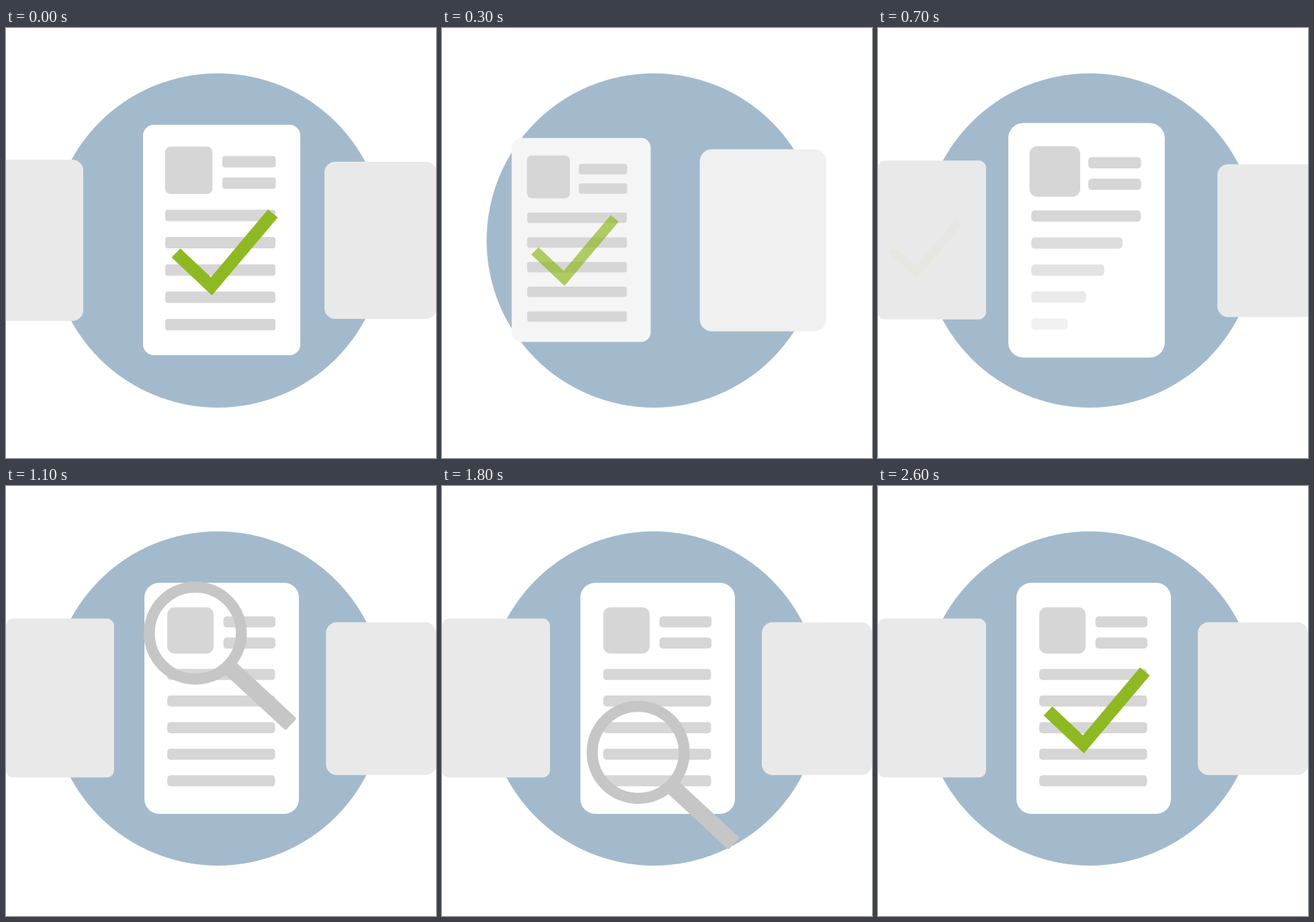
Write an HTML page with a canvas that moves like this. It is 640 px wide and 640 px high and loops after 2.9 s.

```html
<!DOCTYPE html>
<html lang="en">
<head>
<meta charset="utf-8">
<title>Document review</title>
<style>
  html, body { margin: 0; width: 100%; height: 100%; overflow: hidden; background: #fff; }
  canvas { display: block; width: 640px; height: 640px; }
</style>
</head>
<body>
<canvas id="stage" width="640" height="640"></canvas>
<script>
const ctx = document.getElementById('stage').getContext('2d');
const LOOP = 2900, TICK = 100, MID = 316;
const INK = '#d6d6d6', PALE = '#e9e9e9', STEEL = '#c6c6c6';

// Page layouts, relative to the page centre
const CHECKED = {
  photo: { x: -49, y: -103.75, size: 70.5, r: 8 },
  head: { x: 1, y: -125, w: 79.5, gap: 32 },
  body: { x: -84, y: -45, w: 164, gap: 40.6 },
  barH: 17, barR: 4
};
const FRESH = {
  photo: { x: -46.5, y: -101, size: 69, r: 11 },
  head: { x: 2.6, y: -122, w: 77.5, gap: 31.5 },
  body: { x: -81, y: -43.8, w: 160.5, gap: 39.6 },
  barH: 16.5, barR: 5
};

// Stops of the magnifier: tick, x, y
const SCAN = [
  [12, 276.5, 213.5], [14, 345, 226], [16, 345, 315], [17, 345, 315],
  [18, 292, 396.5], [21, 353.5, 415], [23, 439, 457]
];

const clamp = v => Math.max(0, Math.min(1, v));
const mix = (a, b, p) => a + (b - a) * p;
const span = (t, from, to) => clamp((t - from) / (to - from));
const ease = (t, from, to) => (1 - Math.cos(Math.PI * span(t, from, to))) / 2;
const cubic = u => u < .5 ? 4 * u ** 3 : 1 - 4 * (1 - u) ** 3;
const overshoot = (t, from, peak, end, extra) =>
  (1 + extra) * ease(t, from, peak) - extra * ease(t, peak, end);

function box(x, y, w, h, r, fill) {
  if (w <= 0 || h <= 0) return;
  ctx.beginPath();
  ctx.roundRect(x, y, w, h, Math.min(r, w / 2, h / 2));
  ctx.fillStyle = fill;
  ctx.fill();
}

function card(cx, cy, w, h, r, white) {
  const c = Math.round(mix(233, 255, clamp(white)));
  box(cx - w / 2, cy - h / 2, w, h, r, `rgb(${c},${c},${c})`);
}

function group(x, y, scale, alpha, draw) {
  if (alpha <= 0) return;
  ctx.save();
  ctx.translate(x, y);
  ctx.scale(scale, scale);
  ctx.globalAlpha = alpha;
  draw();
  ctx.restore();
}

// grow(row) gives the share of a bar that is drawn
function contents({ photo, head, body, barH, barR }, pop = 1, grow = () => 1) {
  const alpha = ctx.globalAlpha, size = photo.size * pop;
  const bar = (part, i, p) => {
    ctx.globalAlpha = alpha * p;
    box(part.x, part.y + part.gap * i, part.w * p, barH, barR, INK);
  };
  box(photo.x - size / 2, photo.y - size / 2, size, size, photo.r * pop, INK);
  for (let i = 0; i < 2; i++) bar(head, i, grow(0));
  for (let i = 0; i < 5; i++) bar(body, i, grow(i));
}

function check(cx, scale, alpha) {
  group(cx, mix(329, 334, (scale - .69) / .31), scale, alpha, () => {
    ctx.beginPath();
    [[-66, -6], [-20.5, 37], [64.5, -64], [79, -52], [-19, 64], [-79, 7.5]]
      .forEach(([x, y]) => ctx.lineTo(x, y));
    ctx.closePath();
    ctx.fillStyle = '#8fb923';
    ctx.fill();
  });
}

function leavingDoc(t) {
  const move = ease(t, .2, 6), shrink = ease(t, 1, 5.8);
  card(mix(321, 80.3, move), 315.5, mix(234, 161, shrink), mix(343, 236.5, shrink), mix(16, 11, shrink), 1 - move);
  group(mix(321, 71, move), 315.5, mix(1, .745, shrink), 1 - span(t, 3, 6.3), () => contents(CHECKED));
  check(mix(325.5, 70.5, ease(t, 0, 6)), mix(1, .69, ease(t, 0, 5.5)), 1 - ease(t, 0, 8));
}

function arrivingDoc(t) {
  const p = overshoot(t, .5, 7, 11, .045);
  const cx = mix(557.5, 321, p), h = mix(234, 344, p);
  card(cx, MID, mix(167, 230, p), h, mix(16, 22, p), p);
  group(cx, MID, h / 344, 1, () =>
    contents(FRESH, overshoot(t, 3, 7, 10, .078), row => span(t, 4 + row / 2, 7 + row / 2)));
}

function scanPoint(t) {
  const i = Math.max(1, SCAN.findIndex(stop => t <= stop[0]));
  const [a, b] = t > 23 ? SCAN.slice(-2) : SCAN.slice(i - 1, i + 1);
  const p = span(t, a[0], b[0]);
  return [mix(a[1], b[1], p), mix(a[2], b[2], p)];
}

function magnifier(t) {
  const [x, y] = scanPoint(t), away = 1 - cubic(span(t, 7, 12));
  const alpha = ease(t, 7, 10.5) * (1 - span(t, 23, 26));
  group(x + 165 * away, y + 170 * away, 1, alpha, () => {
    ctx.beginPath();
    ctx.arc(0, 0, 68.5, 0, 7);
    ctx.lineWidth = 16.5;
    ctx.strokeStyle = STEEL;
    ctx.stroke();
    ctx.rotate(.747);
    box(72, -9.3, 125, 24.3, 3, STEEL);
  });
}

function render(t) {
  ctx.fillStyle = '#fff';
  ctx.fillRect(0, 0, 640, 640);
  ctx.beginPath();
  ctx.arc(315.2, 316.2, 248.8, 0, 7);
  ctx.fillStyle = '#a3bacd';
  ctx.fill();

  box(-60 - 130 * (t / 3) ** 2, 196, 175, 240, 16, PALE);
  box(476 + 170 * (1 - span(t, 3, 12)) ** 3, 202.8, 164, 227.5, 16, PALE);
  arrivingDoc(t);
  leavingDoc(t);
  magnifier(t);
  check(325.5, 1, span(t, 23, 26));
}

function frame() {
  render(Math.floor(performance.now() % LOOP / TICK));
  requestAnimationFrame(frame);
}
frame();
</script>
</body>
</html>
```
